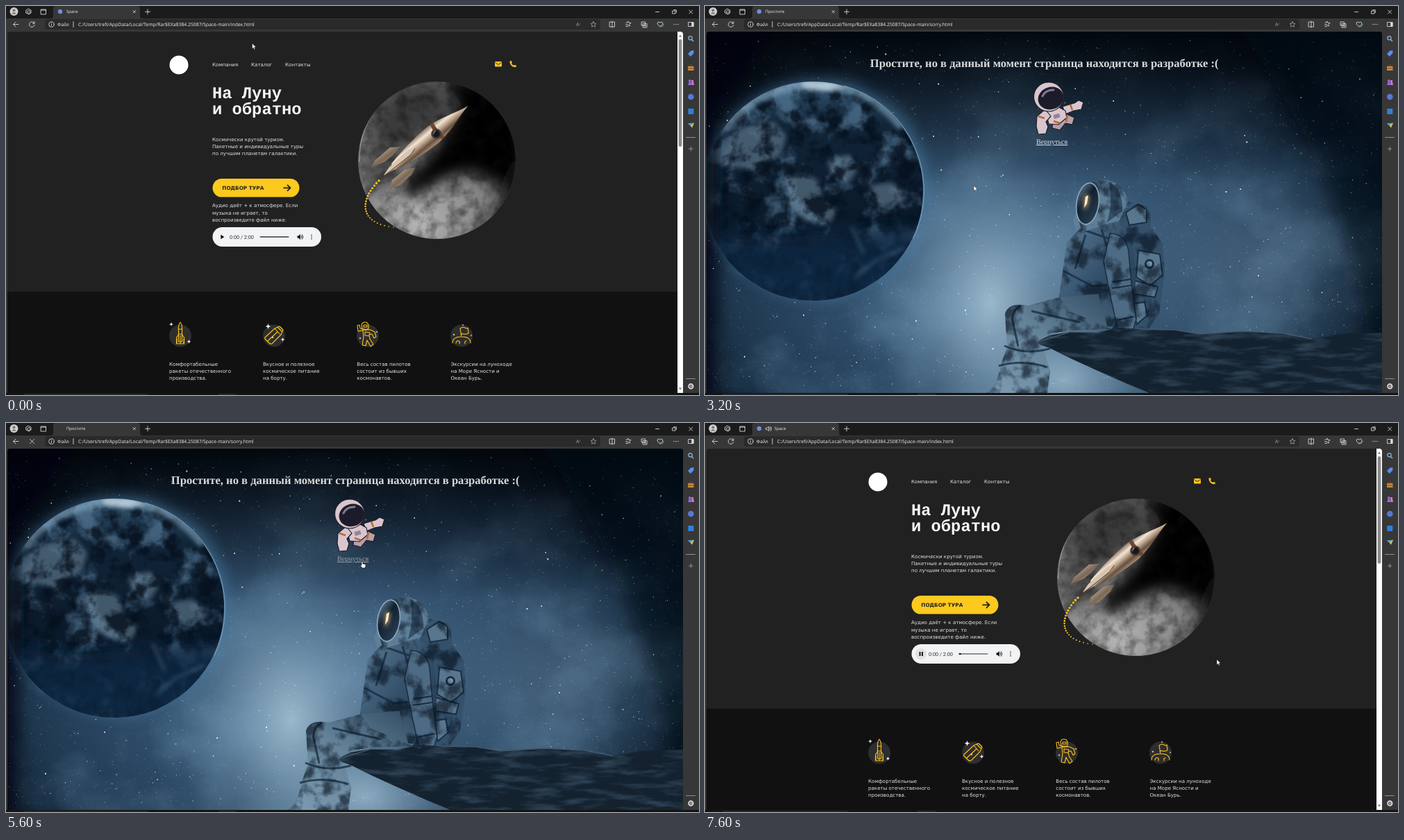
Animation of 998 by 561 pixels, one loop 8 s. Source, as an HTML page:

```html
<!DOCTYPE html>
<html lang="ru">
<head>
<meta charset="utf-8">
<title>Space</title>
<style>
html, body { margin: 0; width: 100%; height: 100%; overflow: hidden; background: #1b1b1b; }
svg { display: block; width: 100vw; height: 100vh; }
text { text-rendering: geometricPrecision; white-space: pre; }
.ui { font-family: "Open Sans", "Noto Sans", sans-serif; fill: #f2f2f2; }
.body { font: 7.1px "DejaVu Sans", Verdana, sans-serif; fill: #e2e2e2; }
.head { font: bold 23.8px "Liberation Mono", "Courier New", monospace; fill: #f4f7fa; }
.serif { font-family: "Liberation Serif", "Times New Roman", serif; fill: #d9d9d9; }
.line { fill: none; stroke: #d6d6d6; stroke-width: .9; stroke-linecap: round; stroke-linejoin: round; }
.gold { fill: none; stroke: #fbc21d; stroke-width: 1.1; stroke-linejoin: round; stroke-linecap: round; }
</style>
</head>
<body>
<svg id="stage" viewBox="0 0 998 561" preserveAspectRatio="none">
<defs>
  <clipPath id="viewClip"><path d="M2 558V41q0-4 4-4H971q4 0 4 4V558z"/></clipPath>
  <clipPath id="moonClip"><circle cx="620.5" cy="222.5" r="113.5"/></clipPath>
  <clipPath id="earthClip"><circle cx="156" cy="267" r="158"/></clipPath>
  <clipPath id="rockClip"><path id="rockShape" d="M474 486l22-11 30-5 38 1 34-9 34 4 45 1 35 6 62-4 58 3 42 8 38-7 26-1 38-1V558H640l-34-14-45-20-35-16-30-15z"/></clipPath>
  <clipPath id="suitClip">
    <path d="M540 321l52-10 22 20 6 46-1 85-24 8-70-30-15-21 11-78zM511 420l-46 12q-28-5-33 12l3 48-8 22-8 30-14 14h88l4-32-10-34-10-8 22-12 30-4 56-2 20-23-38-28zM552 255l22-5q30 4 35 32l30 8 3 28 17 24 3 41-8 60-15 22-60-3-40-150z"/>
  </clipPath>
  <filter id="soft" filterUnits="userSpaceOnUse" x="-60" y="-20" width="1120" height="640"><feGaussianBlur stdDeviation="11"/></filter>
  <filter id="blur3" filterUnits="userSpaceOnUse" x="-60" y="-20" width="1120" height="640"><feGaussianBlur stdDeviation="3"/></filter>
  <filter id="craters" color-interpolation-filters="sRGB">
    <feTurbulence type="fractalNoise" baseFrequency=".055" numOctaves="5" seed="8"/>
    <feColorMatrix values="0 0 0 0 .06 0 0 0 0 .06 0 0 0 0 .06 2 0 0 0 -.75"/>
  </filter>
  <filter id="clouds" color-interpolation-filters="sRGB">
    <feTurbulence type="fractalNoise" baseFrequency=".008 .01" numOctaves="6" seed="4"/>
    <feColorMatrix values="0 0 0 0 .5 0 0 0 0 .66 0 0 0 0 .78 1.5 0 0 0 -.6"/>
  </filter>
  <filter id="land" color-interpolation-filters="sRGB">
    <feTurbulence type="fractalNoise" baseFrequency=".022" numOctaves="6" seed="21"/>
    <feColorMatrix values="0 0 0 0 .36 0 0 0 0 .5 0 0 0 0 .62 5 0 0 0 -2.5"/>
  </filter>
  <filter id="relief" color-interpolation-filters="sRGB">
    <feTurbulence type="fractalNoise" baseFrequency=".04" numOctaves="4" seed="12"/>
    <feColorMatrix values="0 0 0 0 .02 0 0 0 0 .06 0 0 0 0 .11 4 0 0 0 -1.8"/>
  </filter>
  <filter id="grain" color-interpolation-filters="sRGB">
    <feTurbulence type="fractalNoise" baseFrequency=".02 .11" numOctaves="5" seed="3"/>
    <feColorMatrix values="0 0 0 0 .27 0 0 0 0 .37 0 0 0 0 .46 3 0 0 0 -1.35"/>
  </filter>
  <radialGradient id="moonLight" gradientUnits="userSpaceOnUse" cx="595" cy="310" r="190">
    <stop offset="0" stop-color="#b5b5b5"/><stop offset=".4" stop-color="#8d8d8d"/><stop offset="1" stop-color="#555"/>
  </radialGradient>
  <linearGradient id="brass" x1="0" y1="0" x2="0" y2="1">
    <stop offset="0" stop-color="#8d7765"/><stop offset=".28" stop-color="#f3e5d4"/><stop offset=".5" stop-color="#bda38a"/>
    <stop offset=".75" stop-color="#66513f"/><stop offset="1" stop-color="#a48c76"/>
  </linearGradient>
  <linearGradient id="fin" x1="0" y1="0" x2="1" y2="1">
    <stop offset="0" stop-color="#e9dccb"/><stop offset=".5" stop-color="#7c6857"/><stop offset="1" stop-color="#c2ab95"/>
  </linearGradient>
  <radialGradient id="haze" gradientUnits="userSpaceOnUse" cx="0" cy="0" r="1" gradientTransform="translate(450 370) scale(560 390)">
    <stop offset="0" stop-color="#4c6d8c"/><stop offset=".4" stop-color="#345370"/><stop offset=".75" stop-color="#1f3850"/><stop offset="1" stop-color="#0a1826"/>
  </radialGradient>
  <radialGradient id="glow">
    <stop offset="0" stop-color="#b4d0df" stop-opacity=".8"/><stop offset=".45" stop-color="#94b4c9" stop-opacity=".45"/><stop offset="1" stop-color="#7c9fb8" stop-opacity="0"/>
  </radialGradient>
  <linearGradient id="topShade" x1="0" y1="0" x2="0" y2="1">
    <stop offset="0" stop-color="#02060c" stop-opacity=".95"/><stop offset=".42" stop-color="#02060c" stop-opacity="0"/>
  </linearGradient>
  <linearGradient id="ocean" x1="0" y1="0" x2="0" y2="1">
    <stop offset="0" stop-color="#355671"/><stop offset=".2" stop-color="#112538"/><stop offset=".6" stop-color="#0b1a2b"/><stop offset="1" stop-color="#162f4a"/>
  </linearGradient>
  <linearGradient id="suit" x1="0" y1="0" x2="1" y2="1">
    <stop offset="0" stop-color="#5c7c97"/><stop offset=".5" stop-color="#34506a"/><stop offset="1" stop-color="#1f364c"/>
  </linearGradient>
  <linearGradient id="legs" x1="0" y1="1" x2="1" y2="0">
    <stop offset="0" stop-color="#7d9cb3"/><stop offset=".5" stop-color="#648399"/><stop offset="1" stop-color="#2c465e"/>
  </linearGradient>
  <linearGradient id="visor" x1="0" y1="0" x2="1" y2="1">
    <stop offset="0" stop-color="#7690a5"/><stop offset=".4" stop-color="#10202f"/><stop offset="1" stop-color="#2e465a"/>
  </linearGradient>
</defs>

<rect width="998" height="561" fill="#1b1b1b"/>
<path d="M0 18H65q3 0 3-4V4q0-4 4-4H189q4 0 4 4V14q0 4 3 4H998V558H0z" fill="#373737"/>
<rect x="56" y="19" width="800" height="15" rx="4" fill="#2a2a2a"/>

<g clip-path="url(#viewClip)">
<g id="home">
  <rect x="2" y="37" width="966" height="375" fill="#212121"/>
  <rect x="2" y="412" width="966" height="147" fill="#111"/>
  <circle cx="249" cy="85" r="13.5" fill="#fff"/>
  <g id="copy" class="body"><text x="297" y="86.8">Компания</text><text x="353" y="86.8">Каталог</text><text x="402" y="86.8">Контакты</text></g>
  <rect x="704" y="80" width="10" height="7.5" rx="1" fill="#fbc21d"/>
  <path d="M704.5 81.5l4.5 3 4.5-3" fill="none" stroke="#212121" stroke-width=".9"/>
  <path d="M726.4 80.2c0 4 3.3 7 7 7" fill="none" stroke="#fbc21d" stroke-width="2"/>
  <path d="M725.5 79.3h2.8l.5 3-2 1zM734.7 88.2v-2.7l-3-.6-1 1.8z" fill="#fbc21d"/>
  <text class="head" x="297" y="133">На Луну</text>
  <text class="head" x="297" y="156">и обратно</text>
  <rect id="button" x="297.5" y="249" width="125" height="26.5" rx="13.2"/>
  <text x="311.3" y="265.3" font-family="DejaVu Sans, sans-serif" font-weight="700" font-size="7.3" fill="#212121">ПОДБОР ТУРА</text>
  <path d="M399.5 262.3h9.5M405 257.8l4.5 4.5-4.5 4.5" fill="none" stroke="#212121" stroke-width="1.7"/>

  <rect x="297.5" y="319" width="156.5" height="28" rx="14" fill="#f1f3f4"/>
  <circle id="press" cx="311" cy="333" r="8" fill="#dfe1e2"/>
  <path id="play" d="M309.3 329.8v6.4l5-3.2z" fill="#111"/>
  <path id="pause" d="M308.6 330h1.9v6h-1.9zM312 330h1.9v6h-1.9z" fill="#111"/>
  <text x="322" y="335.5" font-family="Roboto, sans-serif" font-size="7.35" fill="#333">0:00 / 2:00</text>
  <rect id="track" x="365.5" y="332" width="42" height="2" rx="1"/>
  <rect id="played" x="365.5" y="332" width="3.5" height="2" rx="1" fill="#111"/>
  <path d="M419.5 331.4h1.7l2.6-2.4v8l-2.6-2.4h-1.7z" fill="#111"/>
  <path d="M425 331q1.6 2 0 4M426 329.3q3.3 3.7 0 7.4" fill="none" stroke="#111" stroke-width=".9"/>
  <path d="M440 330.3v.01M440 333v.01M440 335.7v.01" stroke="#111" stroke-width="1.6" stroke-linecap="round"/>

  <g clip-path="url(#moonClip)">
    <rect x="507" y="109" width="227" height="227" fill="url(#moonLight)"/>
    <g filter="url(#soft)">
      <path d="M540 140l70-28 35 40-80 60-45 15z" fill="#3a3a3a"/>
      <path d="M515 215l35-25 25 30-20 40-35 10z" fill="#505050"/>
      <path d="M635 100l110 20 5 165-45-30-35-16-35 8-48 27-25-10 50-50 40-62z" fill="#060606"/>
      <path d="M740 205l5 100-62 42 35-80z" fill="#161616"/>
    </g>
    <rect x="507" y="109" width="227" height="227" filter="url(#craters)" opacity=".55"/>
    <path d="M509 225c-1-45 20-87 62-106" fill="none" stroke="#b5b5b5" stroke-width="1.5" opacity=".6"/>
  </g>
  <g fill="url(#fin)">
    <path d="M527 232l4-9 22-19 15-1-11 12-12 10z"/>
    <path d="M553 263l3-12 18-15 15-3-5 10-17 16z"/>
  </g>
  <g transform="translate(665.5 144) rotate(-39.5)">
    <path d="M0 0C-24-4-42-13-65-14-90-14-116-10-138-6l-5 6 5 6C-116 10-90 14-65 14-42 13-24 4 0 0z" fill="url(#brass)"/>
    <path d="M-54-13.5h-6q-3 13 0 27h6q-3-13 0-27z" fill="#714630"/>
    <path d="M-158 0l14-4 37-2 9 4-8 4-35 1z" fill="#d8c5b0"/>
    <path d="M-158 1l48 1 12-3" fill="none" stroke="#553f30"/>
    <circle cx="-61" cy="2" r="7.5" fill="#4a3b34"/><circle cx="-61" cy="2" r="5" fill="#15171c"/>
    <path d="M-64 0q2-3 5-2" stroke="#a9a9a9" fill="none"/>
  </g>
  <g id="trail" fill="#fbc21d"></g>

  <g fill="#2e2e2e"><circle cx="251" cy="475.5" r="16"/><circle cx="386" cy="475.5" r="16"/><circle cx="521" cy="475.5" r="16"/><circle cx="656" cy="475.5" r="16"/></g>
  <g class="gold">
    <path d="M248.5 484v-21q0-4 2.5-7 2.5 3 2.5 7v21zM248 466h6M248 473h6M248.5 474l-3 4v9h11v-9l-3-4M251 475v12M246 487v-7M256 487v-7"/>
    <path d="M373 478l14-13 7-3 5 5-3 7-13 13q-2 1-4-1l-6-6q-1-1 0-2zM377 483l14-13M387 465l7 8M391 463l6 6"/>
    <path d="M512 460q1-4 5-4t5 4-1 6q-4 3-8 0zM515 460h5v3h-5zM514 468l-7 1-1-8 3-1 1 5 6 1 9 1 6 3 2 7-3 2-3-6-4 1 1 6 5 8-4 3-5-9-2 8-5-1 2-12zM517 470l7 1-1 5-6-1z"/>
    <path d="M643 486q0-9 13-9t13 9M656 477l-2-12M654 465q4-3 7-1t4 0l1 8q-4 2-7 1t-4 1M648 486q1-4 4-3 2 1 1 4M661 487q-1-4 2-4"/>
  </g>
  <g id="sparks" fill="#fff"></g>
  <rect x="967" y="37" width="9" height="522" fill="#fff"/>
  <rect x="968.6" y="48" width="4.8" height="155" rx="2.4" fill="#8b8b8b"/>
  <path d="M968.8 44.5l2.2-3 2.2 3zM968.8 550.5l2.2 3 2.2-3z" fill="#777"/>
  <g id="status">
    <path d="M2 547H239q3 0 3 3v9H2z" fill="#2b2b2b"/>
    <text class="ui" x="5" y="554.6" font-size="5.9">file:///C:/Users/trefi/AppData/Local/Temp/Rar$EXa8384.25087/Space-main/sorry.html</text>
  </g>
</g>

<g id="sorry">
  <rect x="2" y="37" width="973" height="521" fill="url(#haze)"/>
  <ellipse cx="800" cy="370" rx="230" ry="190" fill="url(#glow)" opacity=".25"/>
  <ellipse cx="410" cy="430" rx="165" ry="230" fill="url(#glow)"/>
  <ellipse cx="520" cy="540" rx="160" ry="110" fill="url(#glow)" opacity=".85"/>
  <rect x="2" y="37" width="973" height="521" filter="url(#clouds)" opacity=".45"/>
  <rect x="2" y="37" width="973" height="521" fill="url(#topShade)"/>
  <path d="M1000 10V558H955q10-250-200-548z" fill="#030a12" opacity=".6" filter="url(#soft)"/>
  <path d="M-30 20H110L18 150V580H-30z" fill="#02060c" opacity=".75" filter="url(#soft)"/>
  <circle cx="163" cy="264" r="157" fill="#47799f" opacity=".75" filter="url(#soft)"/>
  <g clip-path="url(#earthClip)">
    <rect x="-2" y="108" width="320" height="320" fill="url(#ocean)"/>
    <rect x="-2" y="108" width="320" height="320" filter="url(#land)" opacity=".6"/>
    <g fill="#7893a7" opacity=".5" filter="url(#blur3)">
      <path d="M22 200q28-34 78-32l17 19-8 28-25 13-6 24-22-18-34-4z"/>
      <path d="M113 247l30-7 23 13 2 26 23 15-12 20-35-4-21-22z"/>
      <path d="M176 221l31-7 15 17-14 24-25-8zM240 258l28-4 25 17-18 24-33-13z"/>
    </g>
    <rect x="-2" y="108" width="320" height="320" filter="url(#relief)" opacity=".8"/>
    <path d="M-5 320Q90 350 315 310V430H0z" fill="#10273f" opacity=".75" filter="url(#soft)"/>
    <path d="M211 318l18 40M216 392l28-24 44-20" fill="none" stroke="#5d7f9c" stroke-width="4" opacity=".45" filter="url(#blur3)"/>
    <path d="M25 178Q75 112 158 112T285 175" fill="none" stroke="#8db0c8" stroke-width="16" opacity=".55" filter="url(#blur3)"/>
    <path d="M140 108h42l22 9-30 6-34-5z" fill="#c4d8e4" opacity=".8" filter="url(#blur3)"/>
    <path d="M2 150V390" fill="none" stroke="#0a1624" stroke-width="34" opacity=".9" filter="url(#soft)"/>
  </g>
  <path d="M200 115A158 158 0 0 1 300 335" fill="none" stroke="#84aac5" stroke-width="1.4" opacity=".65"/>
  <g id="stars"></g>

  <use href="#rockShape" fill="#14222f"/>
  <rect x="470" y="458" width="510" height="102" filter="url(#grain)" opacity=".5" clip-path="url(#rockClip)"/>
  <path d="M474 486l52-16 38 1 34-9 34 4 45 1 35 6 62-4 58 3 42 8" fill="none" stroke="#42596c" stroke-width="1.5"/>
  <path d="M601 294l25-9 16 11v23l17 24 3 41-8 60-15 22-28-3-18-45-8-70z" fill="#34506a"/>
  <path d="M606 298l18-12 12 8v18l-25 4zM624 352l31 6 4 30-18 15-20-12zM619 396l33 9-4 15-31-5zM613 430l20-3 4 19-15 13z" fill="#58778f" stroke="#1a2d40" stroke-width="2"/>
  <circle cx="640" cy="372" r="7" fill="#1a2d40"/><circle cx="640" cy="372" r="4" fill="#7b98ae"/>
  <path d="M540 321l52-10 22 20 6 46-1 85-24 8-70-30-15-21 11-78z" fill="url(#suit)"/>
  <path d="M511 420l-46 12q-28-5-33 12l3 48-8 22-8 30-14 14h88l4-32-10-34-10-8 22-12 30-4 56-2 20-23-38-28z" fill="url(#legs)"/>
  <path d="M455 432q-14 8-12 22l8 37M431 490q30 14 66 4M423 519q35-10 70 2M548 330l-15 49M571 322l21 68M516 382l42 22 30-2M470 440l70 16M540 321l40 14" fill="none" stroke="#152a3d" stroke-width="3" opacity=".75"/>
  <path d="M583 328q24 1 27 26l4 46 7 52-4 14-23-1-12-55-8-42z" fill="#4d6b84" stroke="#1a2e42" stroke-width="1.5"/>
  <path d="M587 398l26-4M586 407l28-4M593 453l24-5" stroke="#1a2e42" stroke-width="2"/>
  <path d="M552 255l22-5q30 4 35 32l-12 27-27 8-34 12-6-20z" fill="#5e7f98"/>
  <path d="M582 254q20 10 19 42l-22 16q9-31 3-58z" fill="#354f67"/>
  <rect x="400" y="245" width="270" height="315" filter="url(#relief)" opacity=".6" clip-path="url(#suitClip)"/>
  <ellipse cx="551" cy="285" rx="16" ry="30" transform="rotate(8 551 285)" fill="url(#visor)" stroke="#93aec2" stroke-width="1.5"/>
  <path d="M547 274l6-2-2 15-6 9z" fill="#f3bd7c" opacity=".9" filter="url(#blur3)"/><path d="M548 275l4-2-2 12-4 6z" fill="#fff0cf"/>

  <text class="serif" x="488.7" y="88" font-size="16.6" font-weight="700" text-anchor="middle">Простите, но в данный момент страница находится в разработке :(</text>
  <g stroke="#211c2a" stroke-width="1.2" stroke-linejoin="round" fill="#d8c6cc">
    <path d="M515 145l17-5 6-4 7 3-3 10-11 2-12 5z"/>
    <path d="M511 164l10-8 11 5-3 10-10-2-8 10-11-3 1-10z" fill="#b9a0a8"/>
    <path d="M489 147l17-3 13 7 2 10-12 10-14-1z"/>
    <path d="M490 149l-12 10-1 15 3 11 11-1 3-10-3-7 7-8z"/>
    <ellipse cx="495" cy="131" rx="21.5" ry="21"/>
    <ellipse cx="498" cy="133" rx="18" ry="15.5" transform="rotate(-18 498 133)" fill="#1c1b29"/>
  </g>
  <path d="M486 130q4-9 16-9" fill="none" stroke="#7e7b96" stroke-width="3" stroke-linecap="round"/>
  <path d="M480 159l9 3M526 142l3 8M522 158l-2 9M502 166l9 3" stroke="#b66a36" stroke-width="2.5"/>
  <rect x="502" y="156" width="9" height="6" rx="1" transform="rotate(-18 506 159)" fill="#98839b"/>
  <text id="back" class="serif" x="477" y="199" font-size="10.2" text-decoration="underline">Вернуться</text>
</g>
</g>

<g class="ui" font-size="6">
  <text id="tab" y="10.4"></text>
  <text x="74" y="29" font-size="6.6">Файл</text>
  <text id="url" x="104" y="29" font-size="6.85"></text>
  <text x="821" y="29" font-size="7" fill="#aaa">A<tspan font-size="4" dy="-2">»</tspan></text>
</g>
<circle id="favicon" cx="78" cy="8" r="3.2" fill="#6f8fd8"/>
<g id="speaker" class="line"><path d="M88 7h1.5l2.2-2v6.5l-2.2-2H88zM93.3 6.5q1 1.7 0 3.4M94.8 5.3q1.9 3 0 6"/></g>
<circle cx="11.5" cy="8" r="6" fill="#cfcfcf"/><circle cx="11.5" cy="6.3" r="2" fill="#777"/><path d="M8 11.5q3.5-5 7 0z" fill="#777"/>
<g class="line">
  <path d="M29 6l3-2 4 2v4l-3 2-4-2zM31 7.5l2-1 2 1v2l-2 1-2-1zM50.500 5h7v7h-7zM50.500 6h7"/>
  <path d="M183 6.5l3.5 3.5M186.5 6.5L183 10M200.5 8.3h7M204 4.800v7M935.5 8.5h5M960 7h4v4h-4zM961.5 5.700h3.8v3.8M983.7 6l5 5M988.7 6l-5 5"/>
  <path d="M18 26.5h-7.5M14 23l-3.5 3.500L14 30M97 22.5v8"/>
  <path id="reload" d="M40.800 25a3.800 3.800 0 1 0 .2 2.500M41 22.500v2.700h-2.700"/>
  <path id="stop" d="M34.5 23.5l6 6M40.5 23.5l-6 6"/>
  <circle cx="65.5" cy="26.5" r="3.8"/><path d="M65.5 26v2.3M65.5 24.4v.1"/>
  <path d="M846 22.5l1.2 2.6 2.8.3-2.100 1.900.6 2.800-2.500-1.400-2.500 1.400.6-2.800-2.100-1.900 2.800-.3z" stroke="#999"/>
  <path d="M869.5 23h7v7h-7zM873 22v9M893 24h2l1-2 1 2.300 3 .2-2 2 .4 2.500-2.400-1.300M892.500 27h3M893 29.500h2.500M915.500 23h5v5h-5zM917.500 25.500h5.500v5.500h-5.500zM918.700 28.200h3M920.200 26.700v3"/>
  <path d="M942 30l-3.700-3.600q-1-3 1.700-3.600l2 1.400 2-1.400q2.700.7 1.700 3.600z"/>
  <path d="M942 28l3 2 2.500-4" stroke="#4dbd68"/>
  <path d="M962 26.5v.1M965 26.5v.1M968 26.5v.1" stroke-width="1.4"/>
  <path d="M983 23.5h7v6h-7z"/><path d="M988 23.5h2v6h-2z" fill="#ddd"/>
  <g stroke="#999"><path d="M979.5 189.5h13M983.3 206h6M986.3 203v6M979.5 537.5h13"/></g>
  <circle cx="986.3" cy="548.5" r="3.4" stroke-dasharray="1.7 .97" stroke-width="1.6"/><circle cx="986.3" cy="548.5" r="2.6"/><circle cx="986.3" cy="548.5" r=".8"/>
</g>
<circle cx="985.5" cy="46.3" r="2.6" fill="none" stroke="#8eb6e8" stroke-width="1.2"/><path d="M987.5 48.5l2.5 2.5" stroke="#8eb6e8" stroke-width="1.4"/>
<path d="M982 69l4.5-4.5 4-.4-.3 4.3-4.5 4.5z" fill="#5a8fea"/>
<path d="M982 87h8.5v6H982z" fill="#c98a3c"/><path d="M984.5 87v-1.7h3.5V87M982 90h8.5" stroke="#7c4b1e" fill="none"/>
<circle cx="984.8" cy="108" r="2" fill="#8d6be0"/><path d="M982 114l1.5-4h2.8l1.5 4z" fill="#8d6be0"/><path d="M987 107h3v2l1 5h-3.5z" fill="#d774bf"/>
<circle cx="986.3" cy="131" r="4.3" fill="#5878d6"/><rect x="982.3" y="148" width="8" height="8" fill="#2f7fd6"/>
<path d="M981.5 169.5l9.5-1-3 7-2.5-3z" fill="#55a9d9"/><path d="M985.5 172.5l5.5-4-3 7z" fill="#e0bd4a"/>
<path d="M0 558.5H998V561H0z" fill="#121212"/><path d="M25 560h180M306 560h26" stroke="#484848" stroke-width=".7"/>

<path id="arrow" d="M0 0V7.8l1.9-1.7 1.2 2.8 1.3-.6-1.2-2.7 2.500-.1z" fill="#fff" stroke="#111" stroke-width=".5"/>
<path id="hand" d="M0 .8q.9-1.3 1.8 0V4l3.4.8q1 .4.8 1.6L5.3 10H.8L-1.7 6.6q.2-1.3 1.7-.1z" fill="#fff" stroke="#111" stroke-width=".6"/>
</svg>
<script>
const $ = id => document.getElementById(id);
const show = (id, on) => { $(id).style.display = on ? '' : 'none'; };
function add(parent, tag, attrs, text = '') {
  const el = document.createElementNS('http://www.w3.org/2000/svg', tag);
  for (const k in attrs) el.setAttribute(k, attrs[k]);
  el.textContent = text;
  $(parent).append(el);
}
let seed = 7;
const rnd = () => (seed = seed * 16807 % 2147483647) / 2147483647;

// Text blocks: x, first baseline, lines
[
  [297, 194.6, 'Космически крутой туризм.|Пакетные и индивидуальные туры|по лучшим планетам галактики.'],
  [297, 290.4, 'Аудио даёт + к атмосфере. Если|музыка не играет, то|воспроизведите файл ниже.'],
  [235, 518.6, 'Комфортабельные|ракеты отечественного|производства.'],
  [370, 518.6, 'Вкусное и полезное|космическое питание|на борту.'],
  [505.3, 518.6, 'Весь состав пилотов|состоит из бывших|космонавтов.'],
  [640.5, 518.6, 'Экскурсии на луноходе|на Море Ясности и|Океан Бурь.']
].forEach(([x, y, s]) => s.split('|').forEach((line, i) => add('copy', 'text', { x, y: y + i * 10.4 }, line)));

// Dotted trail along a cubic, shrinking with distance
for (let i = 0; i <= 22; i++) {
  const t = i / 22, u = 1 - t;
  const at = (a, b, c, d) => a * u ** 3 + 3 * b * u * u * t + 3 * c * u * t * t + d * t ** 3;
  add('trail', 'circle', { cx: at(537, 511, 505, 558), cy: at(252, 277, 313, 319), r: 1.7 - t * .9 });
}

// Four-point sparkles: x, y, size
[[238, 459, 3], [263.5, 484, 3], [377.5, 462, 4], [398.5, 481, 3], [384, 478, 1.8], [534, 470, 1.6], [510, 479, 1.8], [645, 474, 1.8], [670, 475, 1.5], [658, 460, 1.5]]
  .forEach(([x, y, r]) => {
    const q = r / 4, p = r - q;
    add('sparks', 'path', { d: `M${x} ${y - r}l${q} ${p} ${p} ${q} ${-p} ${q} ${-q} ${p} ${-q} ${-p} ${-p} ${-q} ${p} ${-q}z` });
  });

// Star field in layers: colour, opacity, count, size; denser towards the bottom
[['#bcd3e4', .4, 1900, .9], ['#d8b48c', .4, 500, .9], ['#e6f1f8', .7, 380, 1.1], ['#fff', .85, 60, 1.7]]
  .forEach(([fill, opacity, n, size]) => {
    let d = '';
    while (n) {
      const x = 4 + rnd() * 968, y = 46 + rnd() ** .75 * 508, s = size * (.6 + rnd() * .6);
      if (Math.hypot(x - 156, y - 267) < 161) continue;
      d += `M${x.toFixed(1)} ${y.toFixed(1)}h${s.toFixed(1)}v${s.toFixed(1)}h${-s.toFixed(1)}z`;
      n--;
    }
    add('stars', 'path', { d, fill, opacity });
  });

// Pointer per 400 ms step: x, y, 1 = hand
const STEP = 400;
const pointer = [
  [354.5, 54], [329, 83, 1], [432, 83, 1], [600.5, 83], [709, 83, 1], [713, 101], [399.5, 230],
  [383, 260, 1], [387, 259], [447, 257], [560, 250], [623, 237.5], [590, 226], [546, 213],
  [512, 199, 1], [511.5, 206.5], [418.5, 372], [311, 332], [311, 332], [737, 341]
];
const path = 'C:/Users/trefi/AppData/Local/Temp/Rar$EXa8384.25087/Space-main/';
let last = -1;

function draw(k) {
  const [x, y, hand] = pointer[k];
  const sorry = k >= 8 && k < 15, loading = k === 14;
  const playing = k >= 18, sound = k >= 19, hover = k === 7;
  show('home', !sorry);
  show('sorry', sorry);
  show('status', hover);
  $('button').setAttribute('fill', hover ? '#9c9c9c' : '#fcc91f');
  $('back').style.fill = loading ? '#9b9fa3' : '#d9e1e7';
  show('reload', !loading);
  show('stop', loading);
  show('favicon', !loading);
  show('speaker', sound);
  $('tab').setAttribute('x', sound ? 100 : 87);
  $('tab').textContent = sorry ? 'Простите' : 'Space';
  $('url').textContent = path + (sorry ? 'sorry.html' : 'index.html');
  show('press', k >= 17);
  show('play', !playing);
  show('pause', playing);
  show('played', playing);
  $('track').setAttribute('fill', playing ? '#8d8f90' : '#65686a');
  show('arrow', !hand);
  show('hand', hand);
  $(hand ? 'hand' : 'arrow').setAttribute('transform', `translate(${x} ${y})`);
}
function tick() {
  const k = Math.floor(performance.now() / STEP) % pointer.length;
  if (k !== last) draw(last = k);
  requestAnimationFrame(tick);
}
tick();
</script>
</body>
</html>
```
